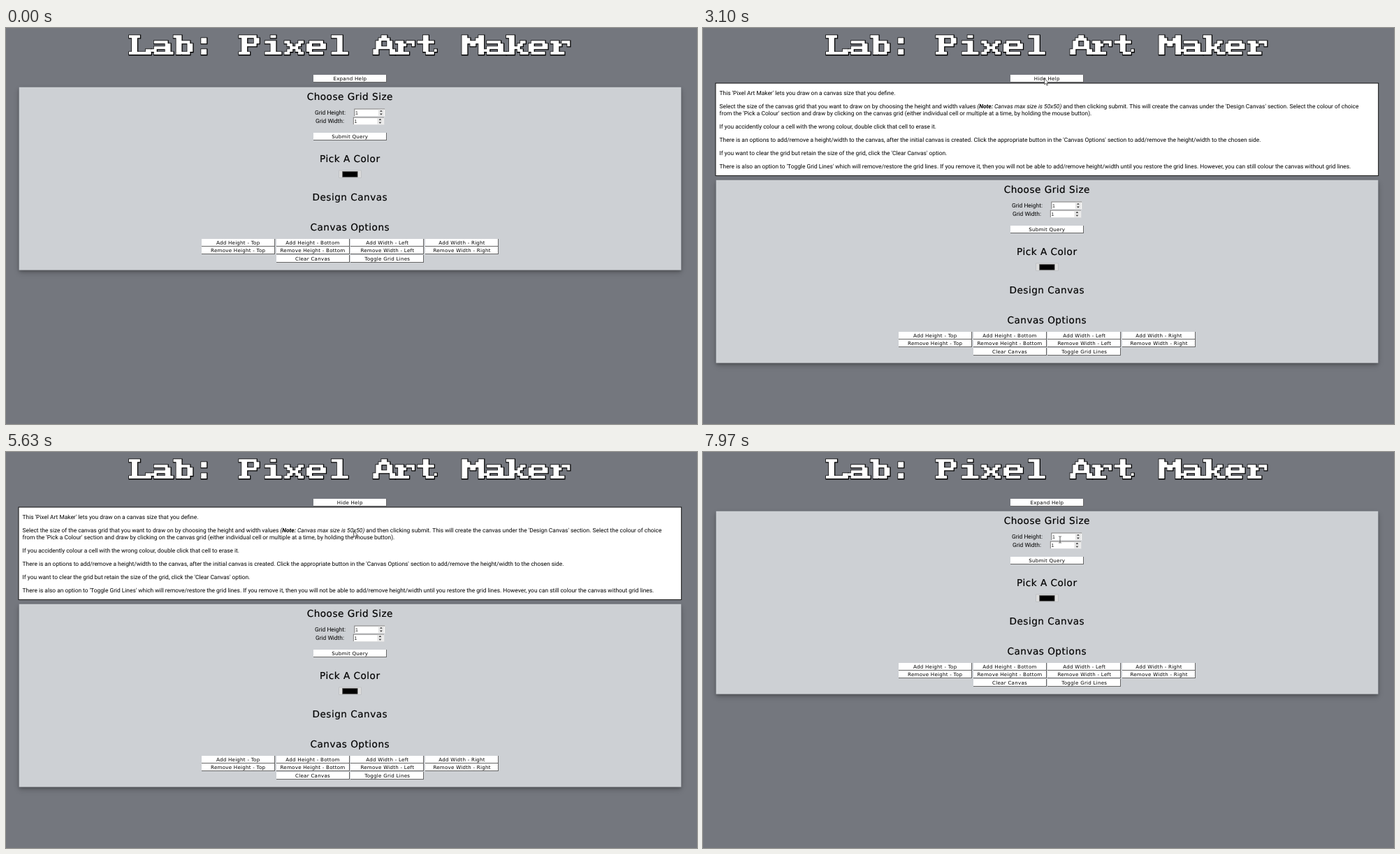
These frames come from a looping animation (989 by 567 pixels, 8000 ms). An HTML page:

```html
<!DOCTYPE html>
<html lang="en">
<head>
<meta charset="utf-8">
<title>Lab: Pixel Art Maker</title>
<style>
  html, body { margin: 0; width: 100%; height: 100%; overflow: hidden; background: #74777e; }
  svg { display: block; width: 100vw; height: 100vh; }
  text { text-rendering: geometricPrecision; white-space: pre; }
  .head { font: 13.6px "DejaVu Sans", sans-serif; letter-spacing: .5px; text-anchor: middle; stroke: #000; stroke-width: .2; }
  .label { font: 7.1px "DejaVu Sans", sans-serif; letter-spacing: .25px; text-anchor: middle; }
  .body { font: 8.38px Roboto, sans-serif; }
  .value { font: 7px "Liberation Sans", sans-serif; fill: #222; }
  .crisp { shape-rendering: crispEdges; }
</style>
</head>
<body>
<svg id="stage" viewBox="0 0 989 567" xmlns="http://www.w3.org/2000/svg">
  <defs>
    <filter id="shadow" x="-5%" y="-10%" width="110%" height="125%">
      <feDropShadow dx="0" dy="2.2" stdDeviation="2.2" flood-opacity=".22"/>
      <feDropShadow dx="0" dy="3.2" stdDeviation="5" flood-opacity=".2"/>
    </filter>
  </defs>
  <rect width="989" height="567" fill="#74777e"/>
  <g id="title" role="img" aria-label="Lab: Pixel Art Maker"></g>
  <g id="help"></g>
  <g id="panel"></g>
  <g id="toggle"></g>
  <path id="arrow" d="M0 0V8.6L2 6.9 3.4 10 4.7 9.4 3.4 6.4H6.2Z" fill="#fff" stroke="#222" stroke-width=".7"/>
  <path id="beam" d="M-1.8 -4.6H-.5L0 -4.1.5 -4.6H1.8M0 -4.1V4.1M-1.8 4.6H-.5L0 4.1.5 4.6H1.8" fill="none" stroke="#333" stroke-width=".8"/>
</svg>
<script>
const LOOP = 8000, MID = 492.3, HELP_SHIFT = 133;
const byId = id => document.getElementById(id);

function add(parent, tag, attrs, text) {
  const node = document.createElementNS('http://www.w3.org/2000/svg', tag);
  for (const key in attrs) node.setAttribute(key, attrs[key]);
  if (text) node.textContent = text;
  return parent.appendChild(node);
}
const rect = (parent, x, y, width, height, fill, more) =>
  add(parent, 'rect', { x, y, width, height, fill, ...more });
const write = (parent, cls, x, y, text) => add(parent, 'text', { class: cls, x, y }, text);

// Block lettering on an 8 by 7 grid
const letters = {
  L: 'M0 0h4v1H0zM1 1h2v5H1zM0 6h8v1H0zM6 5h2v1H6z',
  a: 'M1 2h5v1H1zM5 3h2v3H5zM1 4h4v1H1zM0 5h2v1H0zM1 6h7v1H1z',
  b: 'M0 0h3v1H0zM1 1h2v6H1zM3 2h3v1H3zM5 3h2v3H5zM3 6h3v1H3z',
  ':': 'M2 1h2v2H2zM2 5h2v2H2z',
  P: 'M-.4 0h6.4v1H-.4zM.6 1h2v5H.6zM5 1h2v2H5zM2.6 3h3.4v1H2.6zM-.4 6h4v1H-.4z',
  i: 'M3 0h2v1H3zM1 2h4v1H1zM3 3h2v3H3zM1 6h6v1H1z',
  x: 'M0 2h2v1H0zM5 2h2v1H5zM1 3h2v1H1zM4 3h2v1H4zM2 4h3v1H2zM1 5h2v1H1zM4 5h2v1H4zM0 6h2v1H0zM5 6h2v1H5z',
  e: 'M1 2h5v1H1zM0 3h2v3H0zM5 3h2v1H5zM2 4h5v1H2zM1 6h5v1H1z',
  l: 'M1 0h4v1H1zM3 1h2v5H3zM1 6h6v1H1z',
  A: 'M3 0h2v1H3zM2 1h4v1H2zM1 2h2v2H1zM5 2h2v2H5zM1 4h6v1H1zM0 5h2v2H0zM6 5h2v2H6z',
  r: 'M0 2h3v1H0zM1 3h2v3H1zM4 2h3v1H4zM3 3h1v1H3zM6 3h1v1H6zM0 6h5v1H0z',
  t: 'M2 0h2v6H2zM0 2h6v1H0zM3 6h3v1H3zM6 5h1v1H6z',
  M: 'M0 0h2v7H0zM6 0h2v7H6zM2 1h1v2H2zM5 1h1v2H5zM3 2h2v2H3z',
  k: 'M0 0h3v1H0zM1 1h2v5H1zM3 4h2v1H3zM4 3h2v1H4zM5 2h2v1H5zM4 5h2v1H4zM0 6h3v1H0zM5 6h3v1H5z'
};

function drawTitle() {
  const unit = 3.97, word = [...'Lab: Pixel Art Maker'];
  const layer = (shift, attrs) => word.forEach((ch, i) => letters[ch] && add(byId('title'), 'path', {
    d: letters[ch],
    transform: `translate(${176 + i * unit * 8 + shift} ${10.3 + shift}) scale(${unit})`,
    ...attrs
  }));
  layer(0.3, { fill: '#000', stroke: '#000', 'stroke-width': 0.5 });
  layer(0, { fill: '#fff' });
}

function button(parent, cx, y, text) {
  const x = Math.round(cx - 52.3), crisp = { class: 'crisp' };
  rect(parent, x, y, 105, 11, '#666', crisp);
  rect(parent, x, y, 104, 10, '#fff', crisp);
  return write(parent, 'label', cx, y + 8, text);
}

function numberField(x, y) {
  const panel = byId('panel');
  rect(panel, x, y, 44.5, 11, '#eee');
  rect(panel, x, y, 44, 10.5, '#777');
  rect(panel, x + 1, y + 1, 43, 9.5, '#fff');
  write(panel, 'value', x + 1.7, y + 8.3, '1');
  rect(panel, x + 34.5, y + 1.2, 8.3, 9, '#e6e6e6');
  add(panel, 'path', {
    d: 'M-1.8 -1.4L0 -3.5 1.8 -1.4ZM-1.8 1.4L0 3.5 1.8 1.4Z', fill: '#333',
    transform: `translate(${x + 38.6} ${y + 5.7})`
  });
}

function drawPanel() {
  const panel = byId('panel');
  rect(panel, 18.8, 84.8, 947.4, 261.7, '#cdd0d4', { filter: 'url(#shadow)' });
  write(panel, 'head', MID, 103.3, 'Choose Grid Size');
  write(panel, 'body', 442, 123.8, 'Grid Height:');
  write(panel, 'body', 443, 135.8, 'Grid Width:');
  numberField(498.3, 115.5);
  numberField(496.8, 127.6);
  button(panel, MID, 150, 'Submit Query');
  write(panel, 'head', MID, 192, 'Pick A Color');
  rect(panel, 476.7, 204, 31.6, 10.6, '#dcdcdc', { stroke: '#b4b6b9', 'stroke-width': 0.6 });
  rect(panel, 481.5, 205.3, 21.7, 8.2, '#000', { stroke: '#777', 'stroke-width': 0.5 });
  write(panel, 'head', MID, 247.4, 'Design Canvas');
  write(panel, 'head', MID, 290, 'Canvas Options');
  const column = i => 332.2 + i * 106.8;
  ['Height - Top', 'Height - Bottom', 'Width - Left', 'Width - Right'].forEach((name, i) => {
    button(panel, column(i), 302, 'Add ' + name);
    button(panel, column(i), 313, 'Remove ' + name);
  });
  button(panel, column(1), 325, 'Clear Canvas');
  button(panel, column(2), 325, 'Toggle Grid Lines');
}

function drawHelp() {
  const help = byId('help');
  rect(help, 18, 79, 948.7, 132.4, '#fff', { stroke: '#111', 'stroke-width': 1 });
  const line = (y, text) => write(help, 'body', 23.6, y, text);
  line(95.8, "This 'Pixel Art Maker' lets you draw on a canvas size that you define.");
  const rich = line(114.8, 'Select the size of the canvas grid that you want to draw on by choosing the height and width values ');
  const span = (text, attrs) => add(rich, 'tspan', attrs, text);
  const italic = { 'font-style': 'italic' };
  span('(', italic);
  span('Note:', { ...italic, 'font-weight': 700 });
  span(' Canvas max size is 50x50)', italic);
  span(" and then clicking submit. This will create the canvas under the 'Design Canvas' section. Select the colour of choice", {});
  line(125.2, "from the 'Pick a Colour' section and draw by clicking on the canvas grid (either individual cell or multiple at a time, by holding the mouse button).");
  line(144, 'If you accidently colour a cell with the wrong colour, double click that cell to erase it.');
  line(162.9, "There is an options to add/remove a height/width to the canvas, after the initial canvas is created. Click the appropriate button in the 'Canvas Options' section to add/remove the height/width to the chosen side.");
  line(181.8, "If you want to clear the grid but retain the size of the grid, click the 'Clear Canvas' option.");
  line(200.8, "There is also an option to 'Toggle Grid Lines' which will remove/restore the grid lines. If you remove it, then you will not be able to add/remove height/width until you restore the grid lines. However, you can still colour the canvas without grid lines.");
}

// Pointer moves: end time, x, y, then start time and step count for longer ones
const moves = [
  [900, 655, 448, 500, 5],
  [1170, 494, 365], [1230, 603, 282], [1370, 494, 181], [1430, 603, 239],
  [1630, 490, 178, 1570, 2], [1770, 502, 168],
  [2430, 486, 74, 2030, 5], [2700, 488.7, 72.3, 2570, 2],
  [3630, 408, 141, 3500, 2],
  [3770, 493, 174], [3900, 394, 170],
  [4230, 487, 123, 4100, 2],
  [4370, 470, 116], [4430, 453, 150], [4570, 480, 186], [4700, 520, 175], [4830, 541.2, 152.3],
  [4900, 529, 165],
  [5100, 518, 162], [5230, 509, 163],
  [5830, 490, 80, 5370, 5], [6030, 495.5, 76, 5970, 2], [6230, 496, 75.3, 6170, 2],
  [7030, 488, 90, 6970, 2], [7430, 486, 118, 7170, 3],
  [7830, 510.5, 125.5, 7570, 3], [7970, 511, 125.5]
];

function pointerAt(t) {
  let x = 900, y = 590;
  for (const [end, toX, toY, start = end, steps = 1] of moves) {
    if (t < start) break;
    const gap = (end - start) / Math.max(1, steps - 1);
    const done = t >= end ? 1 : (Math.floor((t - start) / gap) + 1) / steps;
    x += (toX - x) * done;
    y += (toY - y) * done;
    if (done < 1) break;
  }
  return { x, y };
}

drawTitle();
drawHelp();
drawPanel();
const toggleText = button(byId('toggle'), MID, 67, 'Expand Help');

function render(t) {
  const open = t >= 3100 && t < 6570;
  const pressed = t >= 6370 && t < 6570;
  const overText = (t >= 5230 && t < 5370) || t >= 7570;
  const { x, y } = pointerAt(t);
  byId('help').style.display = open ? '' : 'none';
  byId('panel').setAttribute('transform', `translate(0 ${open ? HELP_SHIFT : 0})`);
  byId('toggle').setAttribute('transform', pressed ? 'translate(1 .4)' : '');
  toggleText.textContent = open ? 'Hide Help' : 'Expand Help';
  for (const [id, shown] of [['arrow', !overText], ['beam', overText]]) {
    byId(id).style.display = shown ? '' : 'none';
    byId(id).setAttribute('transform', `translate(${x} ${y})`);
  }
}

const begin = performance.now();
function tick() {
  render((performance.now() - begin) % LOOP);
  requestAnimationFrame(tick);
}
tick();
</script>
</body>
</html>
```
